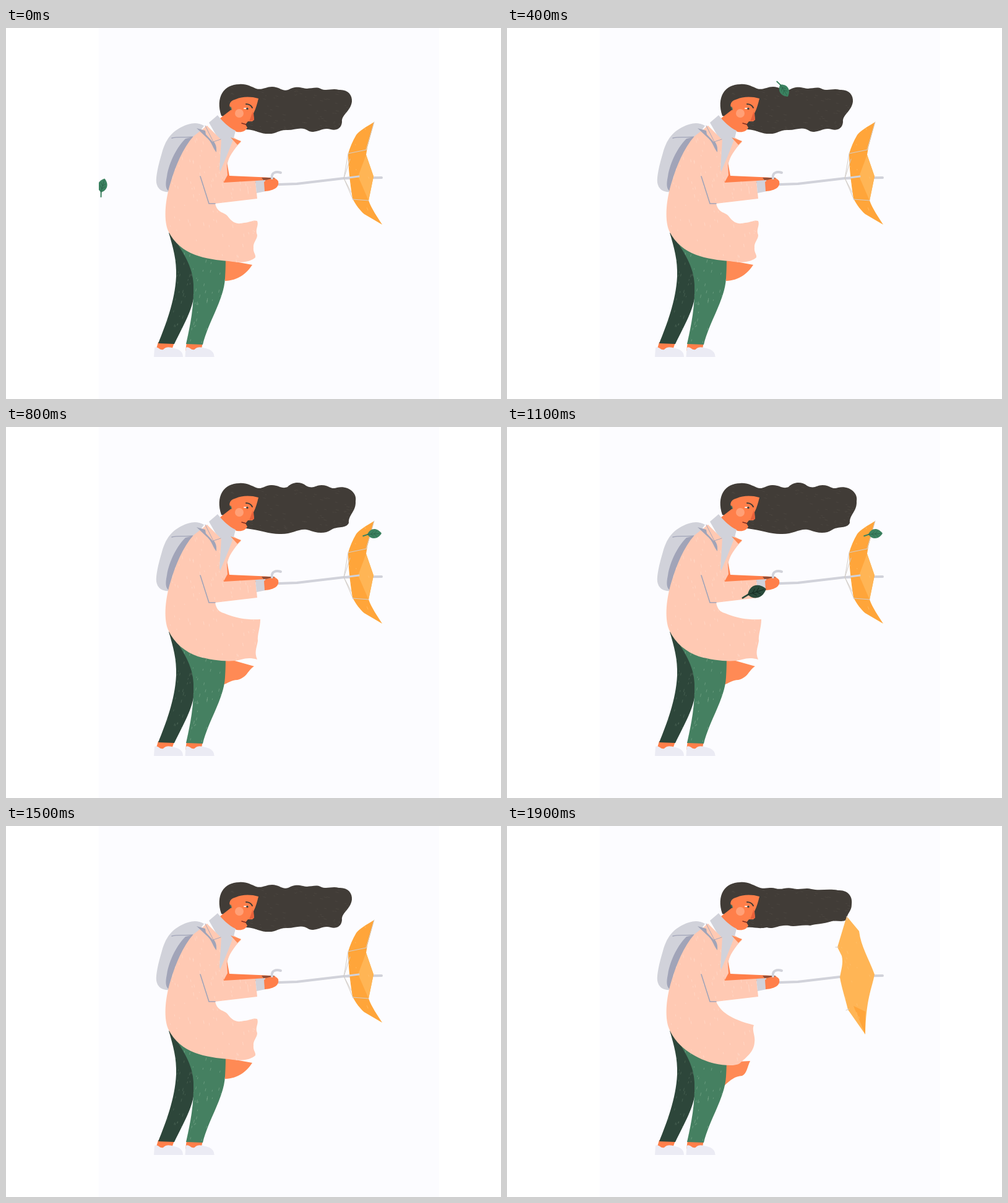
An HTML page with a canvas for the animation above (2 s loop, 800 by 600 pixels).

```html
<!DOCTYPE html>
<html lang="en">
<head>
<meta charset="utf-8">
<title>Windy walk</title>
<style>
  html, body { margin: 0; width: 100%; height: 100%; overflow: hidden; background: #fff; }
  canvas { display: block; }
</style>
</head>
<body>
<canvas id="stage" width="800" height="600"></canvas>
<script>
const ctx = document.getElementById("stage").getContext("2d");
const STEP = 100, STEPS = 20;
const SEQUENCE = "ABCBABCABCABABCACBAC";

const ORANGE = "#ff7f4a", LINING = "#ff8a55", PEACH = "#ffc9b3", GREY = "#d1d2da", SLATE = "#a1a4b8",
      GREEN = "#458061", DARK_GREEN = "#2d463a", HAIR = "#413c37", SHOE = "#ebebf4";

const COAT_TOP = "M325 158L335 181L348 180L345 228L352 250L403 247L406 276L338 284";
const COAT_BACK = "C254 308 258 275 266 250C274 223 286 194 303 175Z";
const HAIR_TOP = "M348 142C338 112 352 91 377 91C389 90 396 95 404 98";
const HAIR_END = "L384 152L348 142Z";

const INVERTED = {
  canopy: "M595 152C582 160 571 166 566 173C560 183 556 193 553 203C553 225 556 250 560 276C566 287 572 295 579 301L608 318C600 305 591 293 586 279L594 240L582 205L584 193Z",
  facet: "M582 205L569 240L586 279L594 240Z",
  color: "#ffa53a", facetColor: "#ffb555",
  ribs: "M553 203L546 243L561 278M546 243L556 212M546 243L558 266M553 203L582 197M560 277L586 279M595 152L582 197"
};
const NORMAL = {
  canopy: "M549 146L569 170C572 195 585 215 594 240C590 262 580 280 579 337L551 297C547 280 541 262 538 245C540 232 544 222 541 210L534 196Z",
  facet: "M560 291L579 300L579 337Z",
  color: "#ffb555", facetColor: "#ffa53a",
  ribs: "M531 196L536 196M548 298L553 296M549 146L550 152"
};

const POSES = {
  A: {
    hair: "C414 101 420 95 430 95C442 95 446 103 456 100C466 95 470 95 480 97C490 100 500 94 508 98C518 103 526 97 538 100C552 99 560 108 559 119C557 135 542 140 543 152C542 164 532 166 525 164C510 160 504 171 490 167C478 158 468 165 455 165C440 164 438 172 422 171C410 171 405 165 388 164",
    coat: "C342 300 352 297 358 304C368 318 376 317 385 315C395 314 400 310 406 312C409 320 402 325 406 335C406 342 399 347 400 355C399 363 404 366 403 371C396 378 380 381 360 377C325 374 282 369 262 328",
    tail: "M354 375L398 383C388 398 375 408 354 409Z",
    umbrella: INVERTED
  },
  B: {
    hair: "C412 102 420 94 428 94C440 93 445 101 455 97C463 88 477 88 485 95C497 101 500 94 510 94C522 94 525 102 535 98C552 94 568 106 565 120C566 137 553 142 554 155C550 165 535 160 526 166C515 174 500 171 490 167C475 162 465 173 445 173C428 174 412 167 388 164",
    coat: "C340 295 345 299 352 301C375 311 395 312 411 311C411 325 406 335 407 346C405 358 401 364 406 376C395 373 388 374 380 376C365 381 335 378 310 371C290 364 272 350 262 328",
    tail: "M355 374L401 387C390 394 390 405 374 409C364 409 358 415 350 417Z",
    umbrella: INVERTED
  },
  C: {
    hair: "C415 104 425 98 434 101C445 104 450 98 462 101C475 104 482 99 492 102C505 105 520 101 535 104C552 103 559 115 557 127C557 138 550 140 549 150C545 157 535 152 525 154C510 159 500 158 490 161C475 159 465 164 455 161C440 159 430 168 420 164C405 167 400 163 388 164",
    coat: "C345 300 360 312 399 322C395 330 402 340 400 350C399 365 388 373 376 384C368 389 350 387 335 384C310 378 275 360 262 328",
    tail: "M353 382L393 380C388 390 388 400 380 404C368 405 362 410 351 420Z",
    umbrella: NORMAL
  }
};

function fill(path, color) {
  ctx.fillStyle = color;
  ctx.fill(new Path2D(path));
}

function line(path, color, width) {
  ctx.strokeStyle = color;
  ctx.lineWidth = width;
  ctx.stroke(new Path2D(path));
}

function circle(x, y, r, color) {
  ctx.fillStyle = color;
  ctx.beginPath();
  ctx.arc(x, y, r, 0, 7);
  ctx.fill();
}

function randomFrom(seed) {
  return () => (seed = seed * 16807 % 2147483647) / 2147483647;
}

// Short pencil scratches kept inside a shape
function texture(path, color, count, [x, y, w, h], lean) {
  const random = randomFrom(count * 77 + x);
  ctx.save();
  ctx.clip(new Path2D(path));
  ctx.strokeStyle = color;
  ctx.lineWidth = 0.6;
  ctx.beginPath();
  for (let i = 0; i < count; i++) {
    const px = x + random() * w, py = y + random() * h, length = 1 + random() * 4;
    ctx.moveTo(px, py);
    ctx.lineTo(px + Math.cos(lean) * length, py + Math.sin(lean) * length);
  }
  ctx.stroke();
  ctx.restore();
}

function drawBackpack() {
  fill("M320 158C308 151 296 154 284 160C268 168 258 180 252 202C246 222 242 240 243 250C245 262 254 266 265 265L310 172Z", GREY);
  fill("M303 176L290 179C277 192 264 215 260 240C257 254 258 262 265 265L310 176Z", SLATE);
  line("M268 178C280 175 290 178 302 176", SLATE, 1.3);
}

function drawHead(hair) {
  const shape = HAIR_TOP + hair + HAIR_END;
  fill(shape, HAIR);
  texture(shape, "#514c46", 110, [350, 93, 210, 75], 0.25);
  fill("M372 115C380 111 395 110 408 114C406 122 404 130 400 138L401 148L398 151L391 151L387 156L390 161C387 167 382 169 373 168C360 163 350 156 346 146L364 132C358 122 364 117 372 115Z", ORANGE);
  fill("M399 135L401 149L393 151Z", "#e8613b");
  circle(367, 125, 5.5, ORANGE);
  circle(377, 138, 7, "#ffa077");
  line("M388 123C392 123 396 125 398 129", HAIR, 2);
  line("M385 130L391 130", "#fff0e8", 1.8);
  circle(390, 130.5, 1.8, HAIR);
  line("M381 154L388 156", "#7d2e22", 1.4);
  line("M363 128L364 132", "#256b60", 1.5);
}

function drawLegs() {
  const back = "M263 331C270 355 276 375 275 402C273 442 258 480 246 510L272 511C287 480 302 455 304 430C310 400 300 370 270 335Z";
  const front = "M266 333C285 360 302 385 303 415C304 450 298 480 291 511L318 512C327 475 352 440 354 405C355 390 355 380 355 368Z";
  fill("M246 508L272 509L267 523L242 522Z", ORANGE);
  fill("M292 508L318 509L315 523L290 522Z", ORANGE);
  fill(back, DARK_GREEN);
  texture(back, "#56705f", 60, [246, 335, 60, 176], 1.8);
  fill(front, GREEN);
  texture(front, "#83ad93", 80, [275, 345, 80, 166], 1.8);
  const shoe = "M240 517C246 514 248 522 254 520C260 514 266 517 272 518C282 520 286 525 286 532L239 532Z";
  fill(shoe, SHOE);
  ctx.save();
  ctx.translate(50.5, 0);
  fill(shoe, SHOE);
  ctx.restore();
}

function drawCoat(coat) {
  fill("M342 141C350 151 360 161 371 166L368 178L354 235L347 235L343 224L344 181L328 153Z", GREY);
  fill("M357 217L361 239L420 241.5L436 243L425 251L349 251Z", ORANGE);
  fill("M413 242L434 242L432 245L416 246Z", "#91503a");
  fill("M368 177L380 184C368 196 359 210 357 222L358 238L352 249L346 233C353 216 362 195 368 177Z", PEACH);
  fill("M363 177L380 183L374 189Z", LINING);
  const shape = COAT_TOP + coat + COAT_BACK;
  fill(shape, PEACH);
  texture(shape, "#ffddcf", 120, [258, 165, 150, 215], 1.4);
  fill("M308 162L322 166L328 176C338 184 341 190 340 201C334 194 333 185 325 178Z", SLATE);
  fill("M325 158L347 180L334 184L323 172L321 160Z", PEACH);
  line("M322 158L335 184L347 180", SLATE, 0.9);
  line("M314 240L328 284L338 284", SLATE, 1.6);
}

function drawUmbrella(umbrella) {
  line("M441 253L470 252L546 243L607 242", GREY, 4);
  fill(umbrella.canopy, umbrella.color);
  fill(umbrella.facet, umbrella.facetColor);
  if (umbrella === INVERTED) line("M546 243L570 240", GREY, 3);
  line(umbrella.ribs, "#d3cec9", 1);
  texture(umbrella.canopy, "#ffc477", 35, [535, 150, 70, 185], 1.2);
}

function drawHands() {
  fill("M403 247L419 246L420 264L405 267Z", GREY);
  fill("M417 249C424 243 437 241 440 248C442 257 434 263 418 264Z", ORANGE);
  line("M430 243C428 233 437 232 444 234", GREY, 4);
}

function drawLeaf(x, y, degrees, scale, color, veinColor) {
  ctx.save();
  ctx.translate(x, y);
  ctx.rotate(degrees * Math.PI / 180);
  ctx.scale(scale, scale);
  fill("M-10 0C-5 -10 6 -11 13 0C6 10 -5 9 -10 0Z", color);
  line("M-17 2L-9 0", color, 2);
  line("M-10 0L10 0M-4 0L0 -4M1 0L5 -4M-4 0L0 4M1 0L5 4", veinColor, 0.6);
  ctx.restore();
}

const mix = (from, to, k) => from.map((v, i) => v + (to[i] - v) * k);

function drawLeaves(step) {
  const start = [156, 256, -75], overHair = [447, 100, 58], caught = [594, 173, -4];
  let light;
  if (step <= 4) light = mix(start, overHair, step / 4);
  else if (step <= 11) light = mix(overHair, caught, Math.min(1, (step - 4) / 3));
  else if (step === 12) light = [630, 160, -15];
  if (light) drawLeaf(...light, 1, "#3b8260", "#275c45");
  if (step >= 9 && step <= 12) {
    const k = (step - 9) / 2;
    drawLeaf(162 + 240 * k, 300 - 33 * k, -45 + 28 * k, 1.35, "#294a3b", "#10261d");
  }
}

function draw(step) {
  const pose = POSES[SEQUENCE[step]];
  ctx.fillStyle = "#fff";
  ctx.fillRect(0, 0, 800, 600);
  ctx.fillStyle = "#fcfcff";
  ctx.fillRect(150, 0, 550, 600);
  ctx.lineCap = "round";
  drawBackpack();
  drawHead(pose.hair);
  fill(pose.tail, LINING);
  drawLegs();
  drawCoat(pose.coat);
  drawUmbrella(pose.umbrella);
  drawHands();
  ctx.save();
  ctx.beginPath();
  ctx.rect(150, 0, 550, 600);
  ctx.clip();
  drawLeaves(step);
  ctx.restore();
}

const startTime = performance.now();
function tick() {
  draw(Math.floor((performance.now() - startTime) / STEP) % STEPS);
  requestAnimationFrame(tick);
}
tick();
</script>
</body>
</html>
```
